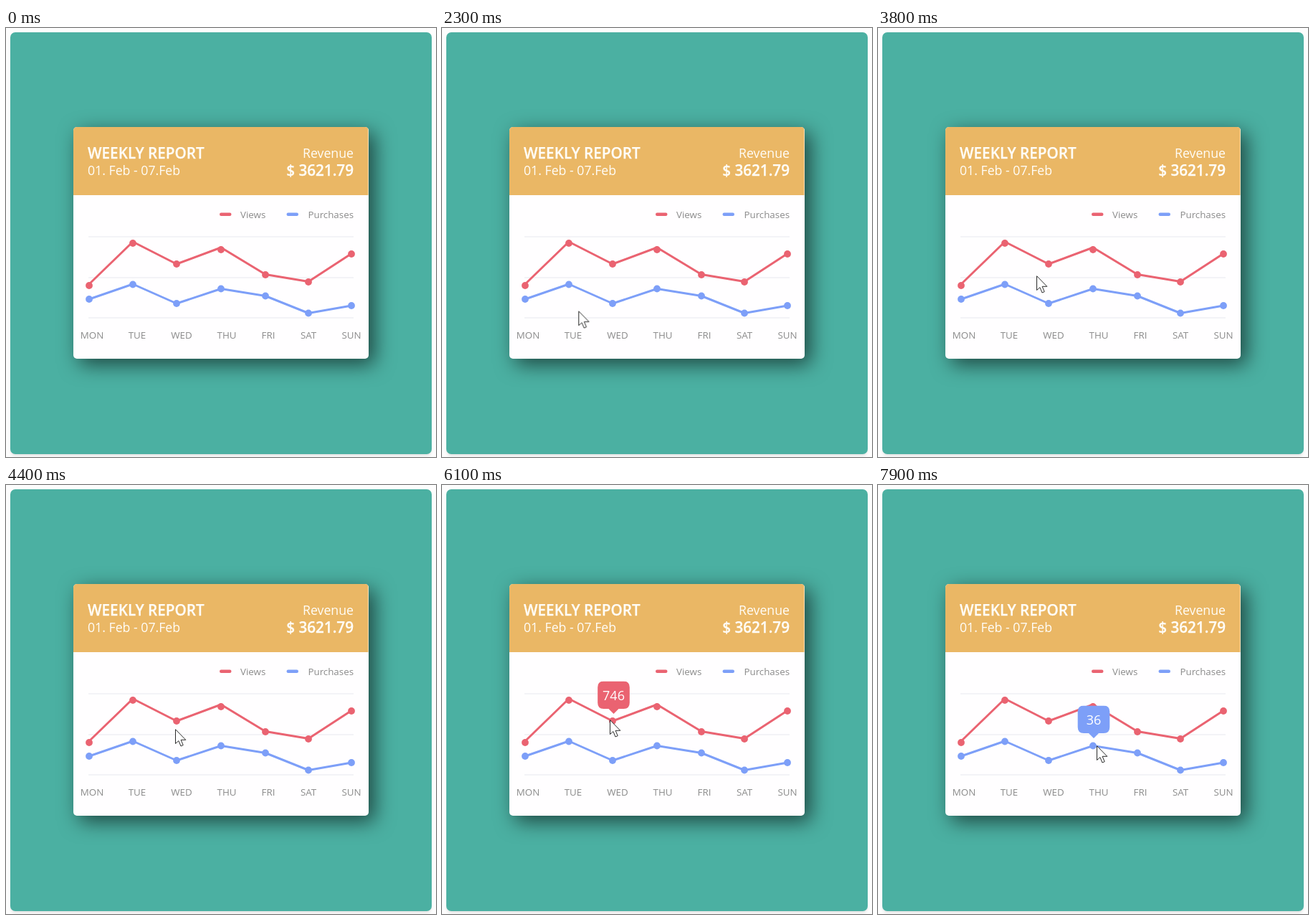
Recreate the animation shown at these times as an HTML page. Size 600 px wide and 598 px high, loop 8000 ms.

```html
<!DOCTYPE html>
<html lang="en">
<head>
<meta charset="utf-8">
<title>Weekly report</title>
<style>
  html, body { margin: 0; width: 100%; height: 100%; overflow: hidden; background: #fdfdfd; }
  .panel, .card { position: absolute; }
  .panel {
    left: 6px; top: 6px; width: 588px; height: 588px;
    border-radius: 7px; background: #4bb0a2;
    box-shadow: 0 3px 4px -1px rgba(0, 0, 0, .12);
  }
  .card {
    left: 94.4px; top: 138.3px; width: 411.2px; height: 323.2px;
    border-radius: 5px; overflow: hidden; background: #fffeff;
    box-shadow: 8px 8px 28px rgba(0, 0, 0, .6);
  }
  .card::before {
    content: ""; position: absolute; inset: 0 1px auto 0;
    height: 94.7px; background: #eab765;
  }
  .card::after {
    content: ""; position: absolute; right: 0; top: 0;
    width: 1px; height: 94.7px; background: #f6dfb8;
  }
  svg { position: absolute; left: 0; top: 0; width: 600px; height: 598px; }
  text { font-family: "Open Sans", "Noto Sans", sans-serif; }
  .head { fill: #fffdf8; font-size: 17.7px; }
  .bold { font-weight: 600; font-size: 20.7px; stroke: #fffdf8; stroke-width: .25; }
  .label { fill: #8b8b8b; font-size: 13.35px; }
  .end { text-anchor: end; }
  .mid, .tip text { text-anchor: middle; }
  .grid { stroke: #f0f0f5; stroke-width: 1.5; }
  .line { fill: none; stroke-width: 3; stroke-linejoin: round; }
  .views { --c: #ea6371; }
  .buys { --c: #7d9ff8; }
  .line { stroke: var(--c); }
  .fill { fill: var(--c); }
  .tip text { fill: #fff; font-size: 18px; }

  .tip, .cursor { animation: 8s linear infinite both; }
  .tue { animation-name: tue; }
  .wed { animation-name: wed; }
  .thu { animation-name: thu; }
  .cursor { animation-name: pointer; }

  @keyframes tue {
    0%, 30.6%, 41.5%, 100% { opacity: 0; transform: translateY(25px); }
    34.4%, 37.75% { opacity: 1; transform: none; }
  }
  @keyframes wed {
    0%, 57.75%, 83.75%, 100% { opacity: 0; transform: translateY(25px); }
    61.5%, 80% { opacity: 1; transform: none; }
  }
  @keyframes thu {
    0%, 88.6% { opacity: 0; transform: translateY(25px); }
    92.4%, 100% { opacity: 1; transform: none; }
  }
  @keyframes pointer {
    0%, 20% { transform: translate(232px, 600px); }
    22.5% { transform: translate(228px, 557px); }
    26.5% { transform: translate(205px, 440px); }
    30.5% { transform: translate(179px, 359px); }
    36.5% { transform: translate(179px, 358px); }
    38.75% { transform: translate(187px, 353px); }
    44% { transform: translate(208px, 348px); }
    51% { transform: translate(234px, 342px); }
    55% { transform: translate(236px, 340px); }
    58% { transform: translate(234px, 328px); }
    76.25%, 79.5% { transform: translate(234px, 327px); }
    84% { transform: translate(268px, 345px); }
    88.6% { transform: translate(303px, 360px); }
    91.25% { transform: translate(304px, 361px); }
    98.75%, 100% { transform: translate(305px, 363px); }
  }
</style>
</head>
<body>
<div class="panel"></div>
<div class="card"></div>
<svg viewBox="0 0 600 598">
  <text class="head bold" x="114" y="182">WEEKLY REPORT</text>
  <text class="head" x="114" y="204.5">01. Feb - 07.Feb</text>
  <text class="head end" x="485" y="181">Revenue</text>
  <text class="head bold end" x="485" y="206">$ 3621.79</text>

  <rect class="views fill" x="298" y="257.5" width="16.5" height="4.5" rx="2.2"/>
  <text class="label" x="327" y="265">Views</text>
  <rect class="buys fill" x="391.5" y="257.5" width="16.5" height="4.5" rx="2.2"/>
  <text class="label end" x="485" y="265">Purchases</text>

  <path class="grid" d="M115 291H485M115 348H485M115 404H485"/>
  <g id="days"></g>
  <g id="chart"></g>

  <g transform="translate(178 357)"><g class="tip tue buys" data-value="41"></g></g>
  <g transform="translate(239.5 329.5)"><g class="tip wed views" data-value="746"></g></g>
  <g transform="translate(301 363.5)"><g class="tip thu buys" data-value="36"></g></g>

  <path class="cursor" d="M.5 .7V20.5L4.9 16.6 8 24 11.2 22.6 8.1 15.3H14.8Z"
        fill="#fff" stroke="#2a2a2a" stroke-linejoin="round"/>
</svg>
<script>
  const xs = [116, 177, 238, 300, 362, 422, 482];
  const days = { MON: 120, TUE: 183, WED: 245, THU: 308, FRI: 366, SAT: 422, SUN: 482 };
  // The views line runs slightly above its dots at some points.
  const series = [
    { name: "views", dots: [359, 300, 329, 309, 344, 354, 315], line: [357, 298, 329, 306, 343.5, 353.5, 314.5] },
    { name: "buys", dots: [378, 357.5, 384, 363.5, 373.5, 397.5, 387], line: [378, 357, 384, 363.5, 373.5, 397.5, 387] }
  ];

  document.getElementById("days").innerHTML = Object.entries(days)
    .map(([day, x]) => `<text class="label mid" x="${x}" y="433">${day}</text>`).join("");

  document.getElementById("chart").innerHTML = series.map(({ name, dots, line }) => {
    const points = xs.map((x, i) => `${x},${line[i]}`).join(" ");
    const marks = xs.map((x, i) => `<circle class="fill" cx="${x}" cy="${dots[i]}" r="4.9"/>`).join("");
    return `<g class="${name}"><polyline class="line" points="${points}"/>${marks}</g>`;
  }).join("");

  for (const tip of document.querySelectorAll(".tip")) {
    tip.innerHTML = `<path class="fill" d="M-14 -56H14Q22.3 -56 22.3 -47.5V-26Q22.3 -17.5 14 -17.5H7L0 -10.5L-7 -17.5H-14Q-22.3 -17.5 -22.3 -26V-47.5Q-22.3 -56 -14 -56Z"/>
      <text y="-29.5">${tip.dataset.value}</text>`;
  }
</script>
</body>
</html>
```
